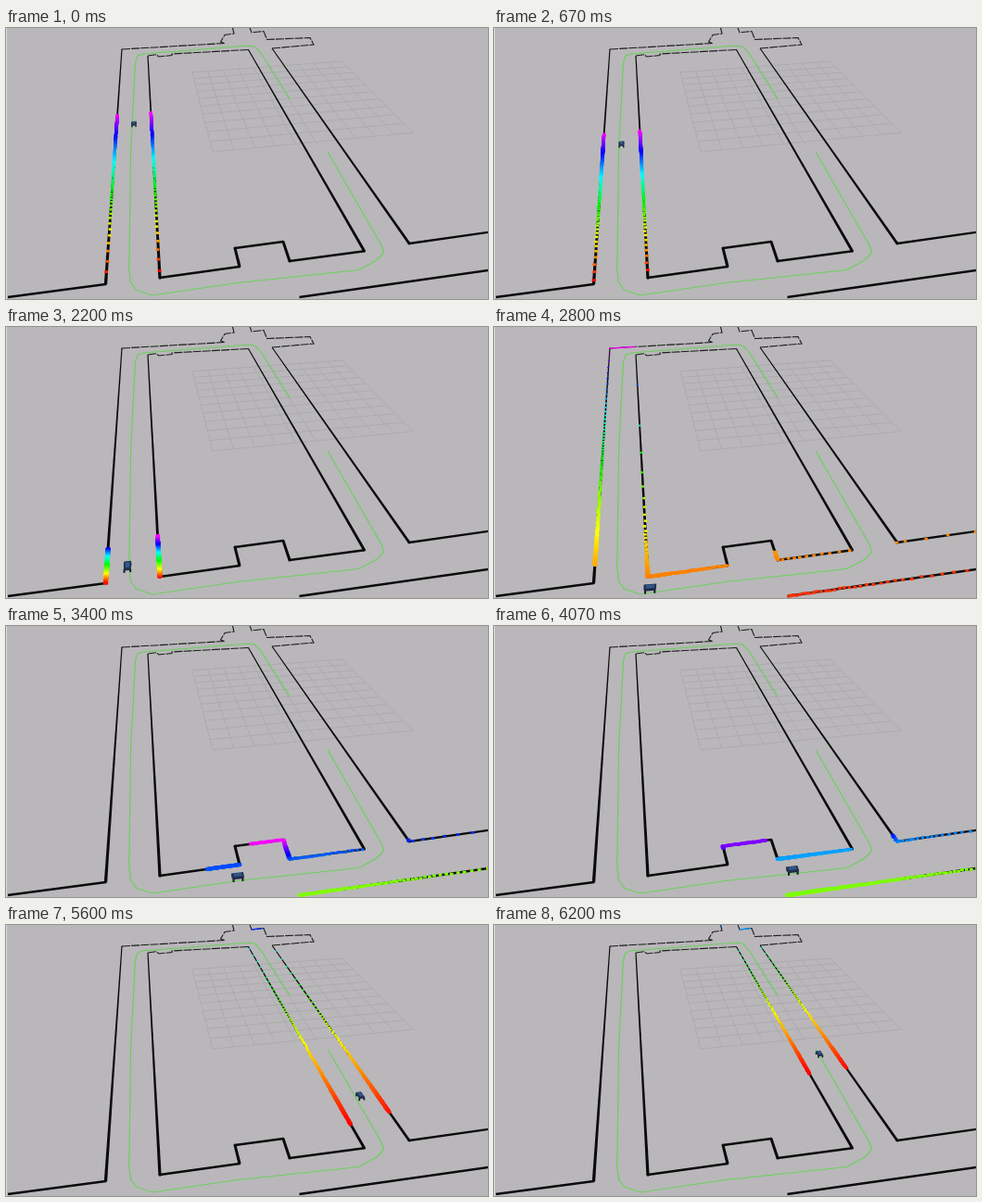
Write an HTML page with a canvas that moves like this. It is 520 px wide and 293 px high and loops after 6270 ms.

```html
<!DOCTYPE html>
<html lang="en">
<head>
<meta charset="utf-8">
<title>Corridor lidar</title>
<style>
  html, body { margin: 0; width: 100%; height: 100%; overflow: hidden; background: #b9b7ba; }
  canvas { display: block; width: 100vw; height: 100vh; }
</style>
</head>
<body>
<canvas id="stage" width="520" height="293"></canvas>
<script>
const W = 520, H = 293, LOOP = 6270, STEP = 200 / 3, LAST = 93;
const RAD = Math.PI / 180, FIELD = 142;
const canvas = document.getElementById('stage');
const ctx = canvas.getContext('2d');

// Floor plane in metres: r runs along the lower hall, s along the long corridors.
const depth = (r, s) => 1 + 0.0363 * s + 0.00606 * r;

function toScreen(r, s) {
  const w = depth(r, s);
  return [(223 + 5.082 * s + 24.264 * r) / w, (134 - 6.861 * s - 1.418 * r) / w];
}

function toFloor([x, y]) {
  const a = 5.082 - 0.0363 * x, b = 24.264 - 0.00606 * x, e = x - 223;
  const c = -6.861 - 0.0363 * y, d = -1.418 - 0.00606 * y, f = y - 134;
  const det = a * d - b * c;
  return [(a * f - c * e) / det, (e * d - b * f) / det];
}

// Corners of the building on screen; some walls run on past the stage edge.
const heavy = [
  [[2, 291], [107.5, 277], [125, 23]],
  [[153, 30], [166, 270], [252, 258], [247, 238], [299, 231], [306, 252], [386.6, 241.3], [261.5, 23.5]],
  [[287, 22], [435, 233], [640, 204]],
  [[316.5, 291], [700, 236.4]]
];
const thin = [
  [[125, 23], [236, 16.5], [231.5, 15], [236, 7.5], [246, 6], [244, -2]],
  [[153, 30], [162, 28.8], [165, 31], [179, 29.5], [179, 28], [261.5, 23.5]],
  [[262, -3], [265, 5], [278, 3.5], [281.5, 12.5], [328, 10.5], [332, 18], [287, 22]]
];
const path = [
  [347, 134], [362, 160], [405, 235], [407.5, 243], [400, 251], [381, 261.5], [250, 275.5],
  [158, 289], [141, 283.5], [134.5, 275], [132.8, 260], [134.7, 130], [139.5, 38],
  [142, 30], [148, 28], [262, 19], [269, 20.5], [275, 27], [306, 76]
];

const segments = [...heavy, ...thin].flatMap(line => {
  const pts = line.map(toFloor);
  return pts.slice(1).map((p, i) => [...pts[i], ...p]);
});

// Way points of the drive: step, screen x, screen y.
const route = [
  [0, 138, 105], [10, 137.5, 127], [20, 137, 171], [33, 131, 261], [36, 133, 277], [41, 160, 285],
  [51, 250, 273], [61, 322, 266], [70, 385, 258], [73, 403, 250], [76, 413, 237], [93, 351, 141]
].map(([k, x, y]) => [k, ...toFloor([x, y])]);

function slope(i, c) {
  const a = route[Math.max(0, i - 1)], b = route[Math.min(route.length - 1, i + 1)];
  return (b[c] - a[c]) / (b[0] - a[0]);
}

function placeAt(k) {
  let i = 0;
  while (i < route.length - 2 && route[i + 1][0] <= k) i++;
  const a = route[i], b = route[i + 1], d = b[0] - a[0], u = (k - a[0]) / d;
  const u2 = u * u, u3 = u2 * u;
  return [1, 2].map(c =>
    (2 * u3 - 3 * u2 + 1) * a[c] + (u3 - 2 * u2 + u) * d * slope(i, c) +
    (3 * u2 - 2 * u3) * b[c] + (u3 - u2) * d * slope(i + 1, c));
}

// The robot faces the way it moves.
function poseAt(k) {
  const [r, s] = placeAt(k), e = 0.01;
  const [r1, s1] = placeAt(k - e), [r2, s2] = placeAt(k + e);
  return [r, s, Math.atan2(s2 - s1, r2 - r1)];
}

function noise(a, b) {
  const v = Math.sin(a * 12.9898 + b * 78.233) * 43758.5453;
  return v - Math.floor(v) - 0.5;
}

function castRay(r, s, angle) {
  const dx = Math.cos(angle), dy = Math.sin(angle);
  let best = Infinity;
  for (const [ax, ay, bx, by] of segments) {
    const ex = bx - ax, ey = by - ay, den = dx * ey - dy * ex;
    if (Math.abs(den) < 1e-9) continue;
    const px = ax - r, py = ay - s;
    const dist = (px * ey - py * ex) / den, along = (px * dy - py * dx) / den;
    if (dist > 0.05 && dist < best && along >= 0 && along <= 1) best = dist;
  }
  return best;
}

function scan(k, [r, s, heading]) {
  const r0 = r - 0.2 * Math.cos(heading), s0 = s - 0.2 * Math.sin(heading);
  const hits = [];
  for (let deg = -FIELD; deg <= FIELD; deg += 0.25) {
    const a = heading + deg * RAD, d = castRay(r0, s0, a);
    if (d === Infinity) continue;
    hits.push([
      r0 + d * Math.cos(a) + 0.05 * noise(deg, k),
      s0 + d * Math.sin(a) + 0.05 * noise(deg + 500, k)
    ]);
  }
  return hits;
}

// Colour limits along s; returns beyond the stage widen them as the drive goes on.
function colorRange(hits, k) {
  const all = hits.map(hit => hit[1]), lo = Math.min(...all), hi = Math.max(...all);
  const farTop = hi > 16.2, drift = Math.max(0, k - 51);
  return [
    lo > -8 ? lo : farTop ? -13 : -9.5 - 0.018 * k,
    farTop ? 15 + 0.28 * drift : hi + 0.04 * drift
  ];
}

function drawScan(k, pose) {
  const hits = scan(k, pose), [lo, hi] = colorRange(hits, k);
  for (const [r, s] of hits) {
    const [x, y] = toScreen(r, s), w = 2.7 / depth(r, s), h = 0.75 * w;
    ctx.fillStyle = `hsl(${300 * Math.max(0, (s - lo) / (hi - lo))} 100% 50%)`;
    ctx.fillRect(x - w / 2, y - h / 2, w, h);
  }
}

function trace(pts) {
  ctx.beginPath();
  pts.forEach(([x, y]) => ctx.lineTo(x, y));
}

function strokeLine(pts, color, width, dash = []) {
  trace(pts);
  ctx.strokeStyle = color;
  ctx.lineWidth = width;
  ctx.setLineDash(dash);
  ctx.stroke();
}

function fillShape(pts, color) {
  trace(pts);
  ctx.fillStyle = color;
  ctx.fill();
}

// A wall gets thicker towards the viewer.
function drawWall([x1, y1], [x2, y2]) {
  const len = Math.hypot(x2 - x1, y2 - y1);
  const flat = Math.abs(x2 - x1) > 2 * Math.abs(y2 - y1) ? 0.8 : 1;
  const nx = (y1 - y2) / len, ny = (x2 - x1) / len;
  const half = y => (0.9 + 0.0088 * y) * flat / 2;
  const a = half(y1), b = half(y2);
  fillShape([
    [x1 + nx * a, y1 + ny * a], [x2 + nx * b, y2 + ny * b],
    [x2 - nx * b, y2 - ny * b], [x1 - nx * a, y1 - ny * a]
  ], '#0b0b0b');
  ctx.beginPath();
  ctx.arc(x2, y2, b, 0, 7);
  ctx.fill();
}

function drawFloor() {
  ctx.fillStyle = '#b9b7ba';
  ctx.fillRect(0, 0, W, H);
  for (let i = 0; i <= 10; i++) {
    strokeLine([toScreen(i, 0), toScreen(i, 10)], '#a9a7aa', 0.8);
    strokeLine([toScreen(0, i), toScreen(10, i)], '#a9a7aa', 0.8);
  }
  thin.forEach(line => strokeLine(line, '#1c1c1c', 1.1, [9, 1.2]));
  heavy.forEach(line => line.slice(1).forEach((p, i) => drawWall(line[i], p)));
}

function drawRobot([r, s, heading]) {
  const c = Math.cos(heading), n = Math.sin(heading), scale = 24 / depth(r, s);
  const at = (f, l, h) => {
    const [x, y] = toScreen(r + f * c - l * n, s + f * n + l * c);
    return [x, y - h * scale];
  };
  const slab = (f, l, h) => [at(f, l, h), at(f, -l, h), at(-f, -l, h), at(-f, l, h)];
  for (const f of [-0.15, 0.15]) for (const l of [-0.1, 0.1]) {
    strokeLine([at(f, l, -0.03), at(f, l, 0.08)], '#151b26', scale * 0.06);
  }
  fillShape(slab(0.18, 0.11, 0.06), '#1a263a');
  fillShape(slab(0.2, 0.12, 0.1), '#20324f');
  fillShape(slab(0.13, 0.07, 0.12), '#34578c');
}

function draw(k) {
  const pose = poseAt(k);
  drawFloor();
  drawScan(k, pose);
  strokeLine(path, '#6bd05c', 1.2);
  drawRobot(pose);
  ctx.fillStyle = '#dddcde';
  ctx.fillRect(0, 0, 1, H);
}

const start = performance.now();
let shown = -1;

function tick() {
  const t = (performance.now() - start) % LOOP;
  const k = Math.min(LAST, Math.floor((Math.floor(t / 10) * 10 + 3.4) / STEP));
  if (k !== shown) draw(shown = k);
  requestAnimationFrame(tick);
}
tick();
</script>
</body>
</html>
```
